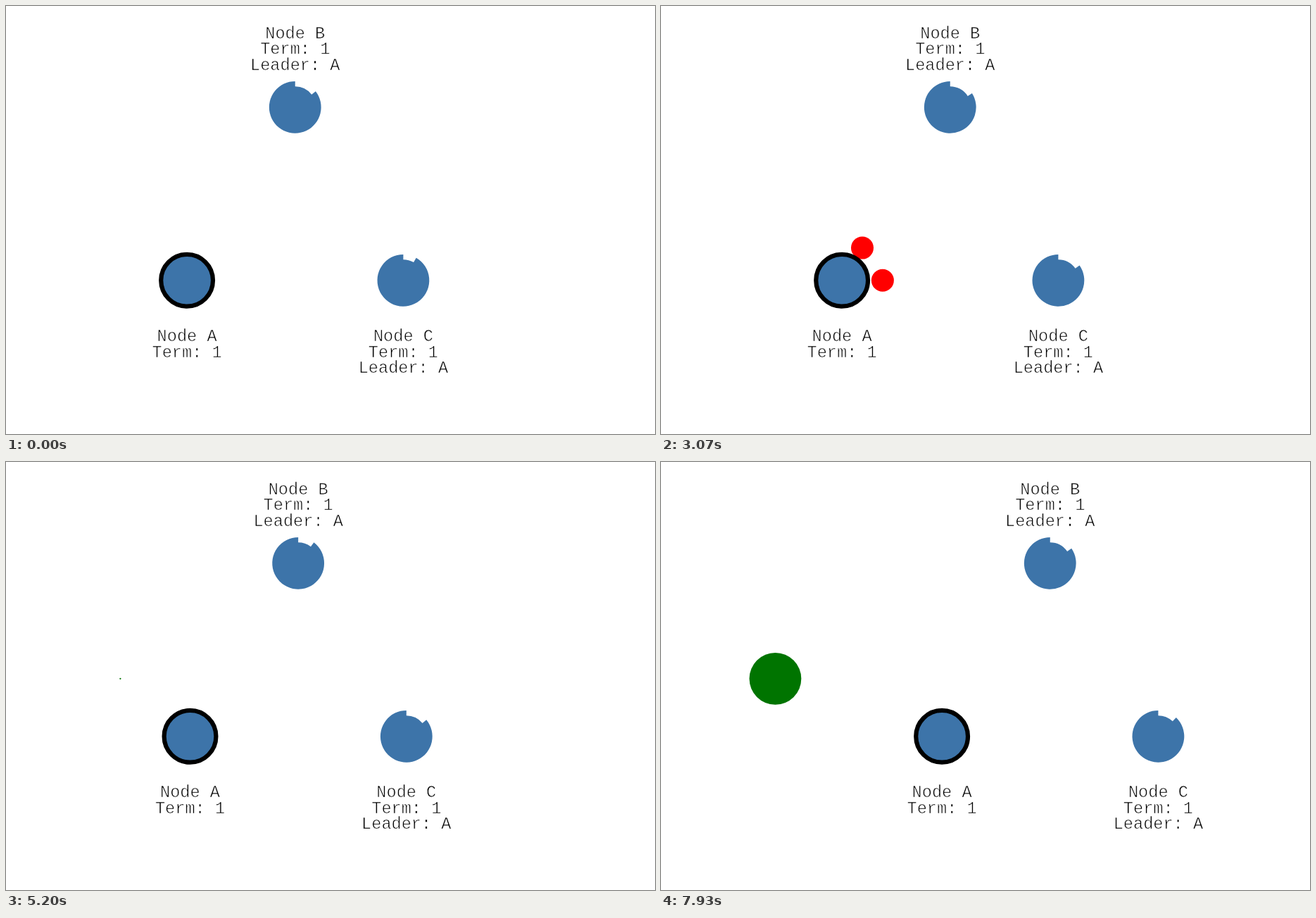
An HTML page that plays this animation: 922 px wide and 608 px high, repeating every 8000 ms.

```html
<!DOCTYPE html>
<html lang="en">
<head>
<meta charset="utf-8">
<title>Heartbeats</title>
<style>
  html, body { margin: 0; width: 100%; height: 100%; overflow: hidden; background: #fff; }
  svg { display: block; width: 922px; height: 608px; }
  /* The white outline thins the letters */
  text {
    font: 23.6px "Courier New", "Liberation Mono", monospace;
    text-anchor: middle; white-space: pre; stroke: #fff; stroke-width: 0.7px;
  }
</style>
</head>
<body>
<svg id="stage" viewBox="0 0 922 608"></svg>
<script>
const LOOP = 8000, FPS = 15;
const BLUE = '#3d74a9', GREEN = '#007400', RED = '#ff0000', REPLY_RED = '#e60a0a';
const RADIUS = 36.9, INNER = 29.6, LINE = 22.4;
const TRAVEL = 988;
const SENDS = [-2095, 391, 2881, 5366, 7860];
const PAN = { start: 5101, length: 500, distance: 142 };

// rates: degrees per ms the timer ring opens after each heartbeat
const leader = { x: 257.1, y: 389.8, textY: 476.4, lines: ['Node A', 'Term: 1'] };
const followers = [
  { x: 410.75, y: 143.8, textY: 45.7, lines: ['Node B', 'Term: 1', 'Leader: A'],
    rates: [0.0472, 0.0341, 0.0278, 0.0351] },
  { x: 564.4, y: 389.8, textY: 476.4, lines: ['Node C', 'Term: 1', 'Leader: A'],
    rates: [0.0269, 0.0325, 0.0378, 0.0276] }
];

const stage = document.getElementById('stage');

function add(parent, tag, attrs, text) {
  const el = document.createElementNS('http://www.w3.org/2000/svg', tag);
  for (const name in attrs) el.setAttribute(name, attrs[name]);
  if (text) el.textContent = text;
  return parent.appendChild(el);
}

function addLabel(parent, node) {
  node.lines.forEach((line, i) =>
    add(parent, 'text', { x: node.x, y: node.textY + i * LINE }, line));
}

const client = add(stage, 'circle', { cx: 162.4, cy: 307.8, r: 0, fill: GREEN });
const cluster = add(stage, 'g', {});

// Messages lie below the nodes
for (const node of followers) node.message = add(cluster, 'circle', { 'stroke-width': 2.3 });
add(cluster, 'circle', {
  cx: leader.x, cy: leader.y, r: RADIUS, fill: BLUE, stroke: '#000', 'stroke-width': 6.2
});
addLabel(cluster, leader);
for (const node of followers) {
  node.disc = add(cluster, 'path', { fill: BLUE });
  addLabel(cluster, node);
}

function timerPath({ x, y }, degrees) {
  const a = Math.max(degrees, 0.1) * Math.PI / 180;
  const at = r => `${x + r * Math.sin(a)} ${y - r * Math.cos(a)}`;
  return `M${at(RADIUS)}A${RADIUS} ${RADIUS} 0 1 1 ${x} ${y - RADIUS}` +
         `V${y - INNER}A${INNER} ${INNER} 0 0 1 ${at(INNER)}Z`;
}

function setMessage(el, from, to, progress, isReply) {
  const look = {
    cx: from.x + (to.x - from.x) * progress,
    cy: from.y + (to.y - from.y) * progress,
    r: isReply ? 7.4 : 16,
    fill: isReply ? 'none' : RED,
    stroke: isReply ? REPLY_RED : 'none',
    visibility: 'visible'
  };
  for (const name in look) el.setAttribute(name, look[name]);
}

const cubicInOut = p => p < 0.5 ? 4 * p ** 3 : 1 - 4 * (1 - p) ** 3;

function render(t) {
  const pan = cubicInOut(Math.min(1, Math.max(0, (t - PAN.start) / PAN.length)));
  cluster.setAttribute('transform', `translate(${PAN.distance * pan} 0)`);
  client.setAttribute('r', RADIUS * pan);

  const trips = (t - SENDS.findLast(s => s <= t)) / TRAVEL;
  const beat = SENDS.findLastIndex(s => s + TRAVEL <= t);
  const sinceReset = t - SENDS[beat] - TRAVEL;

  for (const node of followers) {
    node.disc.setAttribute('d', timerPath(node, node.rates[beat] * sinceReset));
    if (trips < 1) setMessage(node.message, leader, node, trips, false);
    else if (trips < 2) setMessage(node.message, node, leader, trips - 1, true);
    else node.message.setAttribute('visibility', 'hidden');
  }
}

const begin = performance.now();
function tick() {
  const t = Math.max(0, performance.now() - begin) % LOOP;
  // Steps begin on times rounded to 10 ms
  const step = Math.min(LOOP * FPS / 1000 - 1, Math.floor((t + 3.4) * FPS / 1000));
  render(step * 1000 / FPS);
  requestAnimationFrame(tick);
}
tick();
</script>
</body>
</html>
```
